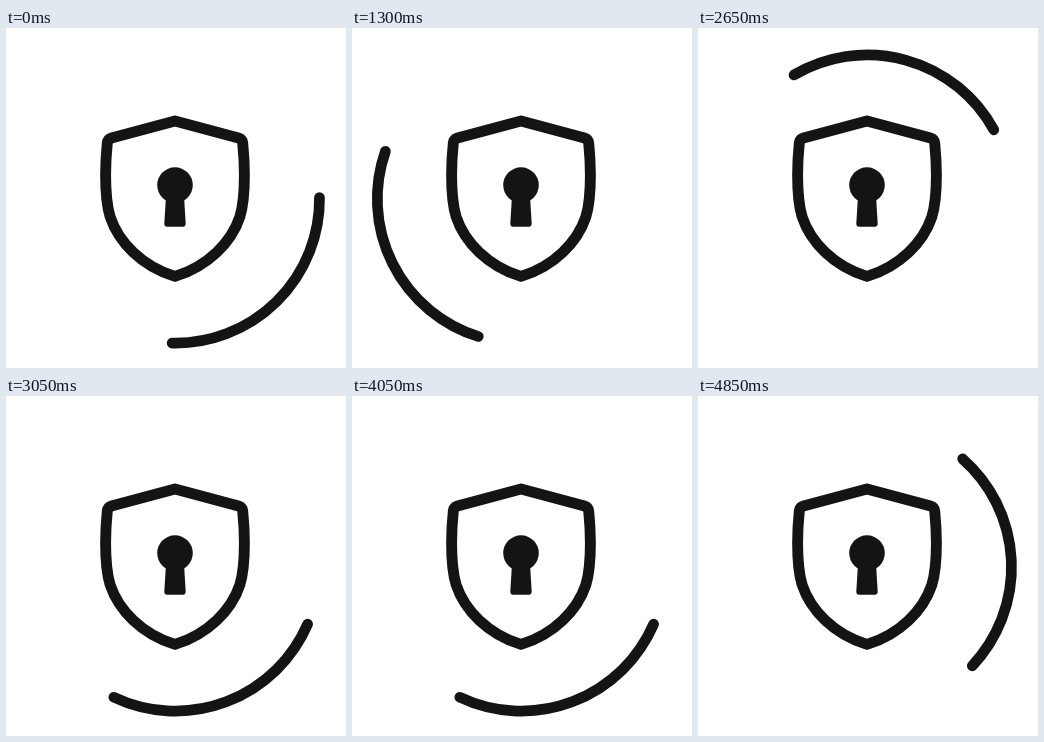
An HTML page that plays this animation: 340 px wide and 340 px high, repeating every 4900 ms.

```html
<!DOCTYPE html>
<html lang="en">
<head>
<meta charset="utf-8">
<title>Shield loader</title>
<style>
  html, body { margin: 0; width: 100%; height: 100%; overflow: hidden; background: #fff; }
  svg { display: block; width: 100%; height: 100%; }
  .line { fill: none; stroke: #141414; stroke-linecap: round; stroke-linejoin: round; }
  .solid { fill: #141414; stroke: #141414; stroke-linejoin: round; }
</style>
</head>
<body>
<svg viewBox="0 0 340 340">
  <path class="line" stroke-width="10.9"
    d="M169 93 L105.5 110 Q101.7 111.2 101.3 115 Q99.6 132 99.6 147
       C99.6 165 100.8 178 104.2 189 C112.5 214 136 238.5 169 248.4
       C202 238.5 225.5 214 233.8 189 C237.2 178 238.4 165 238.4 147
       Q238.4 132 236.7 115 Q236.3 111.2 232.5 110 Z"/>
  <circle cx="169" cy="157.1" r="17.8" fill="#141414"/>
  <path class="solid" stroke-width="6" d="M163 168 H175 L176.7 195.8 H161.3 Z"/>
  <path id="arc" class="line" stroke-width="10.7"/>
</svg>
<script>
  const LOOP = 4900, TICK = 50, STEP = 12;
  const CX = 169.4, CY = 171, R = 144.1, START = -0.6, SPAN = 91.9;
  const arc = document.getElementById('arc');

  const point = deg => {
    const a = deg * Math.PI / 180;
    return `${CX + R * Math.cos(a)} ${CY + R * Math.sin(a)}`;
  };
  arc.setAttribute('d', `M${point(START)} A${R} ${R} 0 0 1 ${point(START + SPAN)}`);

  // One turn per second in 12-degree steps, shown at 20 pictures per second
  function draw() {
    const tick = Math.floor(performance.now() % LOOP / TICK);
    const angle = Math.ceil(tick * 1.5) * STEP;
    arc.setAttribute('transform', `rotate(${angle} ${CX} ${CY})`);
    requestAnimationFrame(draw);
  }
  draw();
</script>
</body>
</html>
```
